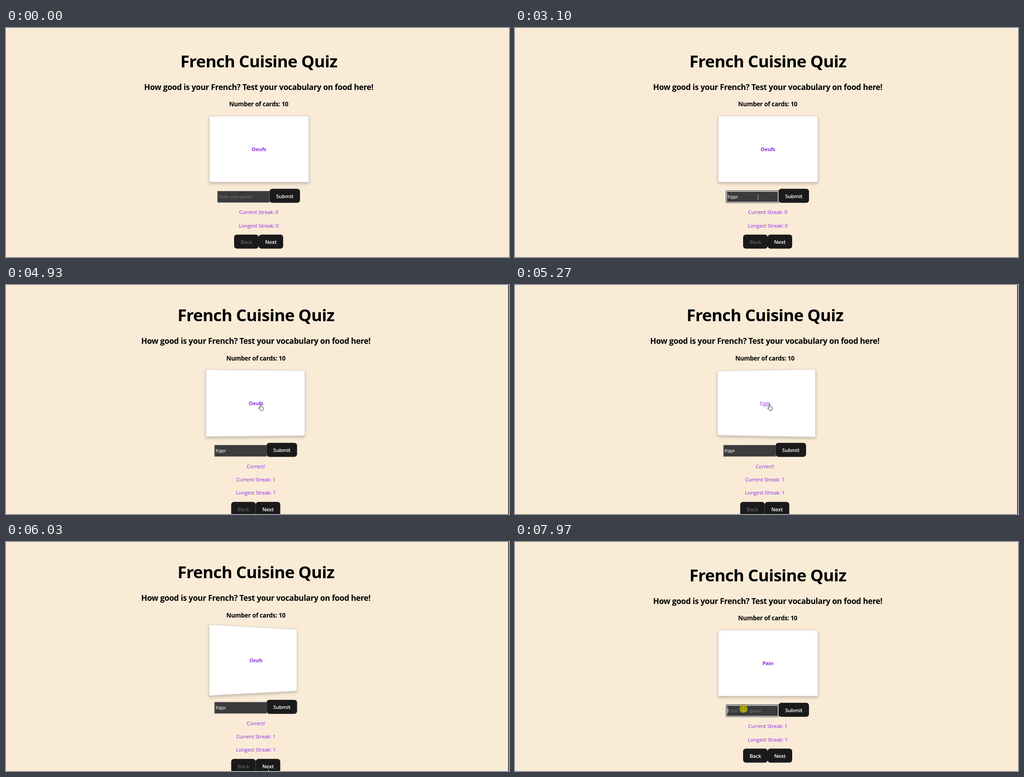
An HTML page for the animation above (8000 ms loop, 1107 px wide and 506 px high).

```html
<!DOCTYPE html>
<html lang="en">
<head>
<meta charset="utf-8">
<title>French Cuisine Quiz</title>
<style>
  html, body { margin: 0; width: 100%; height: 100%; overflow: hidden; background: #faebd7; }
  #page, svg { position: absolute; left: 0; top: 0; width: 1107px; height: 506px; overflow: visible; }
  text, .face { font-family: "Open Sans", "Noto Sans", sans-serif; font-size: 11.4px; letter-spacing: -.016em; }
  text { text-anchor: middle; }
  .bold { font-weight: 700; letter-spacing: -.02em; }
  .btn { font-weight: 600; letter-spacing: -.016em; fill: #fff; }
  .purple { fill: #8a2be2; }
  .dark { fill: #1a1a1a; }
  #field { font: 9.78px "Liberation Sans", Arial, sans-serif; letter-spacing: 0; text-anchor: start; }
  #scene { position: absolute; left: 446.7px; top: 194.4px; width: 220px; height: 147px; perspective: 733px; }
  #card { position: absolute; inset: 0; box-sizing: border-box; background: #fff; border: 1px solid #d2cdc8;
    box-shadow: 0 3px 6px rgba(0, 0, 0, .22); transform-style: preserve-3d; }
  .face { position: absolute; inset: 0; display: flex; align-items: center; justify-content: center;
    color: #8a2be2; backface-visibility: hidden; }
  #back { transform: rotateY(180deg); }
  #scrollbar { position: absolute; left: 1105px; top: 0; width: 2px; height: 506px; background: #4a4a4a; }
</style>
</head>
<body>
<div id="page">
  <div id="scene"><div id="card">
    <div class="face bold" id="front"></div>
    <div class="face" id="back">Eggs</div>
  </div></div>
  <svg>
    <text class="bold" x="556.4" y="86.5" style="font-size:36.6px">French Cuisine Quiz</text>
    <text class="bold" x="556.2" y="136.6" style="font-size:17.4px">How good is your French? Test your vocabulary on food here!</text>
    <text class="bold" x="556.2" y="173.3" style="font-size:13.5px">Number of cards: 10</text>
    <rect x="465.4" y="360.4" width="114.4" height="25" fill="#3b3b3b" stroke="#767676" stroke-width=".8"/>
    <text id="field" x="467.8" y="375.8"></text>
    <rect id="caret" y="367" width="1" height="11" fill="#fff"/>
    <rect class="dark" x="580" y="355.3" width="67" height="31" rx="6"/>
    <text class="btn" x="613.5" y="375.8">Submit</text>
    <text class="purple" id="correct" x="556.4" y="411.4">Correct!</text>
    <g id="below">
      <text class="purple" id="current" x="556.2" y="411.4"></text>
      <text class="purple" id="longest" x="556.2" y="440.7"></text>
      <rect class="dark" x="502" y="456.5" width="54" height="31" rx="6"/>
      <rect class="dark" x="556" y="456.5" width="54" height="31" rx="6"/>
      <text class="btn" id="prev" x="529" y="476.8">Back</text>
      <text class="btn" x="583" y="476.8">Next</text>
    </g>
    <g id="ring" fill="none">
      <rect id="outer" stroke="#101010"/>
      <rect id="inner" stroke="#fff" stroke-width="1.4"/>
    </g>
  </svg>
</div>
<div id="scrollbar"></div>
<svg>
  <g id="cursor">
    <circle id="press" r="9" fill="rgba(190,180,0,.8)"/>
    <path id="arrow" d="M0 0V10.3L2.4 8l1.5 3.4 1.5-.6L4 7.5H7.4Z" fill="#fff" stroke="#111" stroke-width=".8"/>
    <path id="hand" d="M-1.1 1.2a1.1 1.1 0 0 1 2.2 0V5l4.2 1q1.3.4 1.2 1.8l-.6 3.6-1 2.4H0L-4 9q-.4-1.4 1-1.4l1.9 1.3Z"
      fill="#fff" stroke="#111" stroke-width=".9" stroke-linejoin="round"/>
    <path id="beam" d="M-2-4.5H-.6L0-4 .6-4.5H2M0-4V4M-2 4.5H-.6L0 4 .6 4.5H2" fill="none" stroke="#b8b8b8" stroke-width=".9"/>
  </g>
</svg>
<script>
const $ = id => document.getElementById(id);
const LOOP = 8000, BLINK = 530;
const GRADED = 3910, NEXT = 6850;
const FLIP = 4905, UNFLIP = 5749, FLIP_TIME = 520;
const KEYS = [1890, 2080, 2280, 2350];

// Moves: start, end, x, y
const MOVES = [
  [0, 0, 721, 436], [230, 760, 535, 374], [3130, 3480, 602, 372],
  [4190, 4760, 560, 263.5], [5780, 6040, 578, 504], [6080, 6200, 580, 511],
  [6400, 6600, 578, 495.5], [6930, 7560, 503, 368.5]
];
const PRESSES = [[1360, 1480], [3640, 3780], [4770, 4890], [5660, 5740], [6670, 6840], [7900, 8000]];

// Boxes: x, y, width, height
const INPUT = [465, 360, 115, 25.6], SUBMIT = [580, 355.3, 67, 31],
  BACK = [502, 456.5, 54, 31], NEXT_BTN = [556, 456.5, 54, 31], CARD = [447, 194, 220, 147];

const between = (t, a, b) => t >= a && t < b;
const show = (id, on) => { $(id).style.visibility = on ? 'visible' : 'hidden'; };
const clamp = p => Math.min(1, Math.max(0, p));
const smooth = p => p * p * (3 - 2 * p);
const inside = ([x, y, w, h], px, py) => px >= x && px <= x + w && py >= y && py <= y + h;

// The CSS "ease" curve
function ease(p) {
  const bez = (a, b, u) => 3 * a * u * (1 - u) ** 2 + 3 * b * u * u * (1 - u) + u ** 3;
  let lo = 0, hi = 1;
  for (let i = 0; i < 20; i++) {
    const mid = (lo + hi) / 2;
    if (bez(.25, .25, mid) < p) lo = mid; else hi = mid;
  }
  return bez(.1, 1, lo);
}

function pointerAt(t) {
  let [, , x, y] = MOVES[0];
  for (const [a, b, tx, ty] of MOVES.slice(1)) {
    const k = smooth(clamp((t - a) / (b - a)));
    x += (tx - x) * k;
    y += (ty - y) * k;
  }
  return [x, y];
}

function focusAt(t) {
  if (between(t, 1360, 3640) || t >= 7900) return INPUT;
  if (between(t, 3640, 4770)) return SUBMIT;
  return between(t, 6670, 7900) ? NEXT_BTN : null;
}

function drawField(t, focus) {
  const typed = t < NEXT ? 'Eggs'.slice(0, KEYS.filter(k => t >= k).length) : '';
  const field = $('field');
  field.textContent = typed || 'Enter your guess';
  field.setAttribute('fill', typed ? '#fff' : '#757575');
  const last = [1360, ...KEYS, 7900].filter(k => t >= k).pop();
  show('caret', focus === INPUT && Math.floor((t - last) / BLINK) % 2 === 0);
  $('caret').setAttribute('x', 467.8 + (typed ? field.getComputedTextLength() : 0));
}

function drawRing(focus, shift) {
  show('ring', focus);
  if (!focus) return;
  const [x, y, w, h] = focus, radius = focus === INPUT ? 1 : 6;
  const place = (id, d) => {
    const box = { x: x - d, y: y - d, width: w + 2 * d, height: h + 2 * d, rx: radius };
    for (const k in box) $(id).setAttribute(k, box[k]);
  };
  $('ring').setAttribute('transform', `translate(0 ${focus === NEXT_BTN ? shift : 0})`);
  place('outer', .4);
  place('inner', -.7);
}

function drawCursor(t, dx, dy, shift) {
  const [x, y] = pointerAt(t), px = x - dx, py = y - dy;
  const hit = (box, s = 0) => inside(box, px, py - s);
  const kind = hit(INPUT) ? 'beam'
    : hit(SUBMIT) || hit(CARD) || hit(BACK, shift) || hit(NEXT_BTN, shift) ? 'hand' : 'arrow';
  for (const id of ['arrow', 'hand', 'beam']) show(id, t >= 70 && id === kind);
  show('press', PRESSES.some(([a, b]) => between(t, a, b)));
  $('cursor').setAttribute('transform', `translate(${x} ${y})`);
}

function draw(t) {
  const graded = between(t, GRADED, NEXT);
  const [dx, dy, shift] = graded ? [-6.4, -6.5, 29.3] : [0, 0, 0];
  const streak = t < GRADED ? 0 : 1;
  const focus = focusAt(t);
  const turn = ease(clamp((t - FLIP) / FLIP_TIME)) - ease(clamp((t - UNFLIP) / FLIP_TIME));

  $('page').style.transform = `translate(${dx}px, ${dy}px)`;
  $('below').setAttribute('transform', `translate(0 ${shift})`);
  show('scrollbar', graded);
  show('correct', graded);
  $('current').textContent = `Current Streak: ${streak}`;
  $('longest').textContent = `Longest Streak: ${streak}`;
  $('prev').style.fill = t < NEXT ? '#5f5f5f' : '#fff';
  $('front').textContent = t < NEXT ? 'Oeufs' : 'Pain';
  $('card').style.transform = `rotateY(${turn * 180}deg)`;
  drawField(t, focus);
  drawRing(focus, shift);
  drawCursor(t, dx, dy, shift);
}

const start = performance.now();
function tick() {
  draw((performance.now() - start) % LOOP);
  requestAnimationFrame(tick);
}
tick();
</script>
</body>
</html>
```
